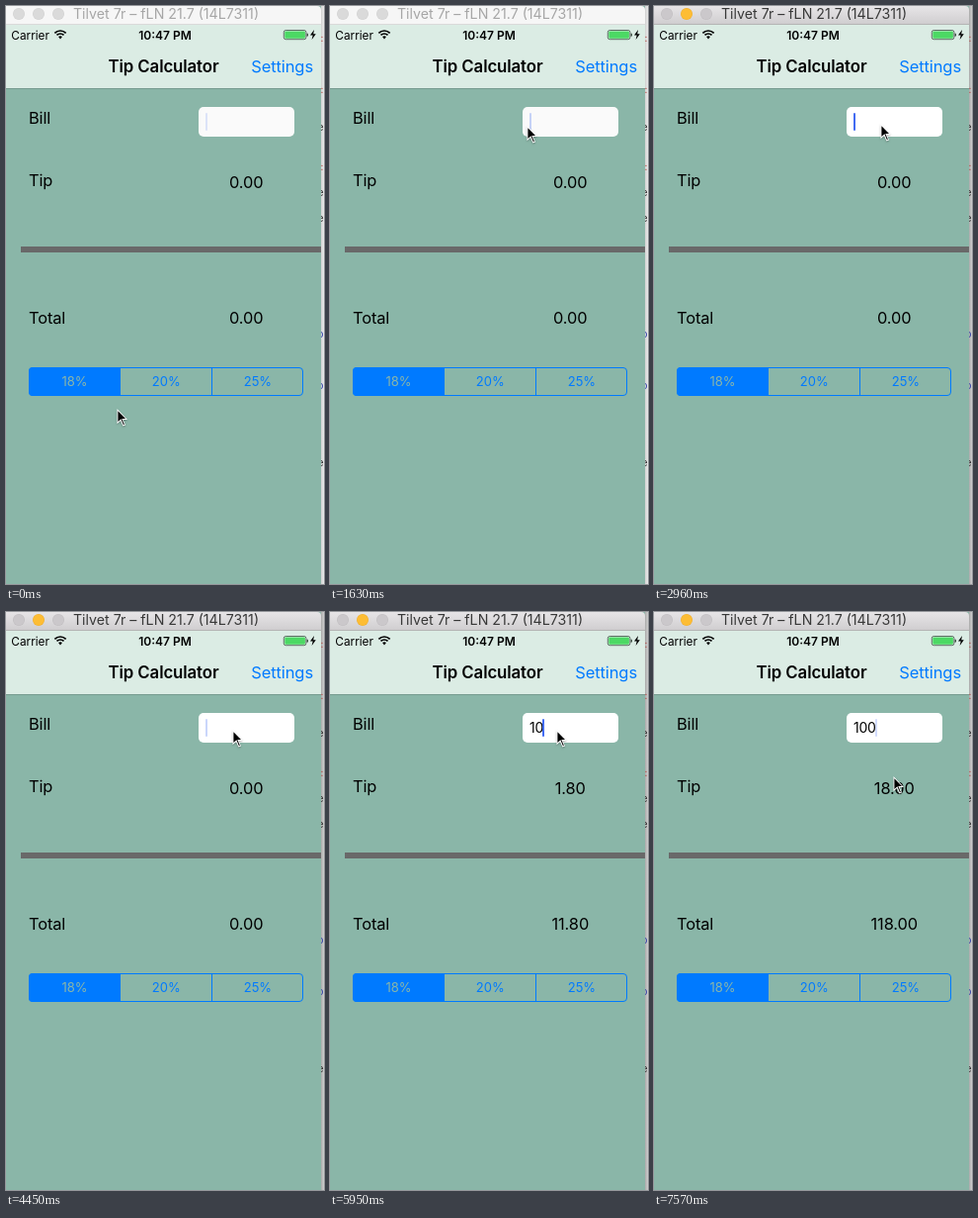
Write an HTML page with a canvas that moves like this. It is 322x584 px and loops after 8 s.

```html
<!DOCTYPE html>
<html lang="en">
<head>
<meta charset="utf-8">
<title>Tip Calculator</title>
<style>
html, body { margin: 0; width: 100%; height: 100%; overflow: hidden; }
canvas { display: block; width: 322px; height: 584px; }
</style>
</head>
<body>
<canvas id="stage" width="322" height="584"></canvas>
<script>
const ctx = document.getElementById('stage').getContext('2d');
const LOOP = 8000, STEP = 145;
const BODY = '#8ab6a8', BAR = '#dbece4', BLUE = '#007aff';
const FOCUS = 2960;
const KEYS = [4600, 5950, 6100];

// Pointer strokes: start time, number of steps, Bezier points
const MOVES = [
  { start: 140, steps: 8, path: [[112, 407], [15, 370], [78, 140], [199, 121]] },
  { start: 2520, steps: 3, path: [[199, 121], [209, 121], [219, 119], [229, 119]] },
  { start: 6700, steps: 7, path: [[229, 119], [230, 149], [264, 166], [242, 166]] }
];

// The caret stays solid for `hold` after each wake, then blinks
const WAKES = [
  { time: -520, hold: 450 }, { time: 3100, hold: 1350 },
  { time: KEYS[0], hold: 450 }, { time: KEYS[1], hold: 750 }
];

function bezier(points, s) {
  const r = 1 - s, w = [r * r * r, 3 * r * r * s, 3 * r * s * s, s * s * s];
  return [0, 1].map(axis => points.reduce((sum, p, i) => sum + p[axis] * w[i], 0));
}

function pointerAt(t) {
  const move = MOVES.findLast(m => t >= m.start);
  if (!move) return MOVES[0].path[0];
  const u = Math.min(1, (Math.floor((t - move.start) / STEP) + 1) / move.steps);
  return bezier(move.path, 1 - (1 - u) ** 2);
}

function caretAt(t) {
  const wake = WAKES.findLast(w => t >= w.time);
  const age = t - wake.time - wake.hold;
  if (age < 0) return 1;
  const phase = age % 850;
  return phase < 400 ? .28 * Math.max(0, 1 - phase / 160) : 1;
}

function box(color, x, y, w, h, r = 0) {
  ctx.fillStyle = color;
  ctx.beginPath();
  ctx.roundRect(x, y, w, h, r);
  ctx.fill();
}

function dot(color, x, y, r) {
  ctx.fillStyle = color;
  ctx.beginPath();
  ctx.arc(x, y, r, 0, Math.PI * 2);
  ctx.fill();
}

function poly(color, points) {
  ctx.fillStyle = color;
  ctx.beginPath();
  points.forEach(([x, y]) => ctx.lineTo(x, y));
  ctx.closePath();
  ctx.fill();
}

function blend(x0, y0, x1, y1, from, to) {
  const g = ctx.createLinearGradient(x0, y0, x1, y1);
  g.addColorStop(0, from);
  g.addColorStop(1, to);
  return g;
}

// Returns the drawn width
function text(str, x, y, size, color = '#000', align = 'left', weight = 400, spacing = 0) {
  ctx.font = `${weight} ${size}px Inter, "Open Sans", sans-serif`;
  ctx.letterSpacing = spacing + 'px';
  ctx.textAlign = align;
  ctx.fillStyle = color;
  ctx.fillText(str, x, y);
  return ctx.measureText(str).width;
}

function drawEdge(active) {
  const [near, far] = active ? ['#a9a9a9', '#cfcfcf'] : ['#cfcfcf', '#ececec'];
  box(blend(319, 0, 322, 0, near, far), 319, 0, 3, 584);
  const marks = (ch, color, ...rows) =>
    rows.forEach(y => text(ch, 321.5, y, 10, color, 'right'));
  marks(':', '#b0443c', 36, 88, 166);
  marks('o', '#3344a8', 335, 387);
  marks('e', '#333', 126, 192, 218, 465);
}

function drawTitleBar(active) {
  box(active ? blend(0, 0, 0, 18, '#e7e5e7', '#d0ced0') : '#f6f6f6', 0, 0, 319, 18, [0, 4, 0, 0]);
  box(active ? '#b4b4b4' : '#dadada', 0, 18, 319, 1);
  for (let i = 0; i < 3; i++) {
    const lit = active && i === 1;
    dot(lit ? '#f0b033' : active ? '#c2bfc2' : '#d2d2d2', 13 + 20 * i, 8, 6);
    dot(lit ? '#fdbd34' : active ? '#cbc8cb' : '#dadada', 13 + 20 * i, 8, 5.4);
  }
  text('Tilvet 7r – fLN 21.7 (14L7311)', 162, 13, 14.2, active ? '#383838' : '#a6a6a6', 'center');
}

function drawWifi() {
  const from = -Math.PI * .75, to = -Math.PI * .25;
  ctx.strokeStyle = ctx.fillStyle = '#000';
  ctx.lineWidth = 1.7;
  for (const r of [8, 5]) {
    ctx.beginPath();
    ctx.arc(55, 33, r, from, to);
    ctx.stroke();
  }
  ctx.beginPath();
  ctx.moveTo(55, 33.5);
  ctx.arc(55, 33, 2.7, from, to);
  ctx.fill();
}

function drawBattery() {
  ctx.strokeStyle = '#26382c';
  ctx.lineWidth = .7;
  ctx.beginPath();
  ctx.roundRect(281.3, 24.5, 22.6, 9.2, 2);
  ctx.stroke();
  box('#4cd964', 282.3, 25.5, 20.6, 7.2, 1);
  box('#26382c', 304.6, 27.5, 1.3, 3.4, [0, 1.5, 1.5, 0]);
  poly('#000', [[312, 24], [308, 29.6], [310.7, 29.6], [309.6, 34], [313.8, 28.2], [311.2, 28.2]]);
}

function drawNav() {
  box(BAR, 0, 19, 319, 64);
  box('rgba(0,0,0,.15)', 0, 83, 319, 1);
  text('Carrier', 5.3, 33.5, 11.8);
  drawWifi();
  text('10:47 PM', 161, 33.5, 12, '#000', 'center', 600);
  drawBattery();
  text('Tip Calculator', 159.5, 67, 16.8, '#000', 'center', 600, -.1);
  text('Settings', 311, 67, 16.5, BLUE, 'right', 400, -.1);
}

function drawForm(t, active) {
  const bill = '100'.slice(0, KEYS.filter(k => t >= k).length);
  const amount = Number(bill);
  const label = (s, y) => text(s, 23, y, 16.4, '#000', 'left', 400, -.1);
  const value = (n, y) => text(n.toFixed(2), 243.3, y, 16.4, '#000', 'center', 400, -.1);

  label('Bill', 118.7);
  label('Tip', 181.7);
  label('Total', 320.6);
  value(amount * .18, 184);
  value(amount * 1.18, 320.6);
  box('#696969', 15, 243, 304, 6);

  box(active ? '#fff' : '#fafafa', 195, 102, 97, 30, 5);
  const width = text(bill, 202, 122, 14, '#000', 'left', 400, -.3);
  ctx.globalAlpha = caretAt(t);
  box('#426bf2', Math.round(201.5 + width), 108, 2, 18, 1);
  ctx.globalAlpha = 1;
}

function drawRates() {
  box(BLUE, 23, 365, 93, 29, [4, 0, 0, 4]);
  ctx.strokeStyle = BLUE;
  ctx.lineWidth = 1;
  ctx.beginPath();
  ctx.roundRect(23.5, 365.5, 277, 28, 3.5);
  ctx.moveTo(208.5, 365);
  ctx.lineTo(208.5, 394);
  ctx.stroke();
  ['18%', '20%', '25%'].forEach((s, i) =>
    text(s, 69.5 + i * 92.7, 384, 13, i ? BLUE : BODY, 'center'));
}

function drawPointer([x, y]) {
  ctx.save();
  ctx.translate(x, y);
  ctx.shadowColor = 'rgba(0,0,0,.3)';
  ctx.shadowBlur = 2;
  ctx.shadowOffsetY = 1;
  poly('#fff', [[.5, 0], [.5, 15.2], [4, 12], [6.4, 17.6], [9, 16.5], [6.6, 11], [11, 11]]);
  ctx.shadowColor = 'transparent';
  poly('#000', [[1.4, 2.2], [1.4, 13], [4.4, 10.3], [6.9, 16.3], [7.9, 15.9], [5.3, 10.1], [9, 10.1]]);
  ctx.restore();
}

function draw(t) {
  const active = t >= FOCUS;
  drawEdge(active);
  box(BODY, 0, 0, 319, 584);
  drawNav();
  drawTitleBar(active);
  drawForm(t, active);
  drawRates();
  drawPointer(pointerAt(t));
}

const start = performance.now();
function tick() {
  draw((performance.now() - start) % LOOP);
  requestAnimationFrame(tick);
}
tick();
</script>
</body>
</html>
```
